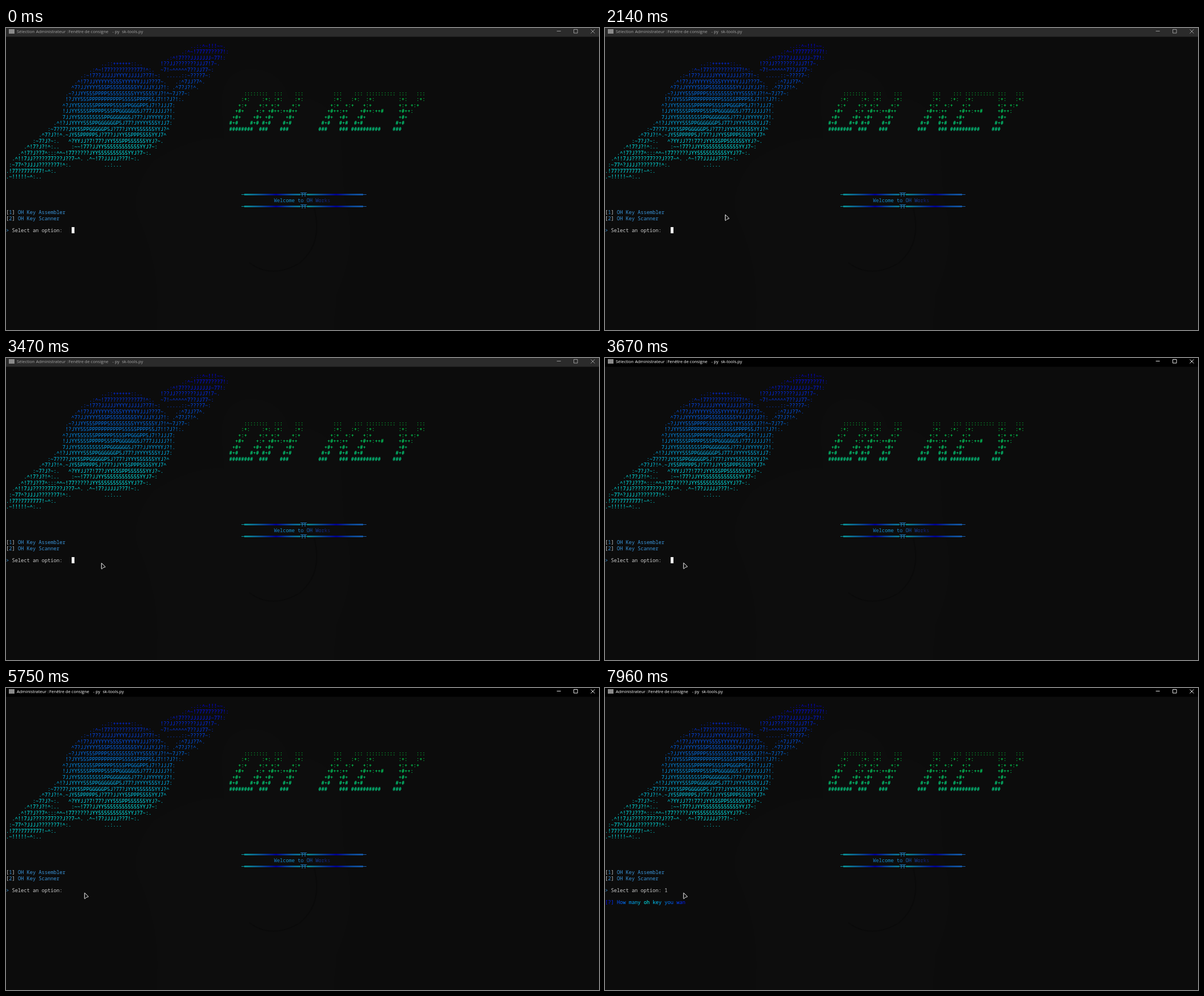
Animation, 1048 px wide and 534 px high, one loop 8 s. Source, as an HTML page with a canvas:

```html
<!DOCTYPE html>
<html lang="fr">
<head>
<meta charset="utf-8">
<title>Terminal</title>
<style>
  html, body { margin: 0; width: 100%; height: 100%; overflow: hidden; background: #0c0c0c; }
  canvas { display: block; }
</style>
</head>
<body>
<canvas id="stage" width="1048" height="534"></canvas>
<script>
const LOOP = 8000, COL = 5.26, ROW = 10.52;
const MONO = '8.767px "Noto Sans Mono", "DejaVu Sans Mono", monospace';
const SANS = '7.5px "Open Sans", "Noto Sans", sans-serif';
const BLUE = '#3a96dd', GREY = '#cccccc';
const ctx = document.getElementById('stage').getContext('2d');

const WING = `
                                                              ..::^~!!!~~.
                                                           .:^~!77777???7!:
                                                      .:^!7???JJJJJJJ~77!:
                                ..::++++++::..      !??JJ???????JJJ7!7~.
                            .:^~!77?????????77!^:.  ~7!~^^^^^7??JJ77~:
                         .:~!7??JJJJJYYYYJJJJJ??7!~:  .....::~????7~:
                       .^!7?JJYYYYY5555YYYYYYJJJ???7~.   .:^7JJ?7^.
                      ^7?JJYYYY555P555555555YYJJJYJJ?!: .^7?J?!^.
                    .~?JJYY555PPPP555555555YYY5555YJ?!^~7J?7~:
                    !?JYY555PPPPPPPPPPP55555PPPP55J7!!?J?!:.
                   ^?JYY555555PPPPPP5555PPGGGPP5J7!?JJJ7:
                   !JJYY5555PPPPP555PPGGGGGG5J?77JJJJJ?!.
                   7JJYY555555555PPGGGGGG5J?7?JJYYYYYJ?!.
                .^!?JJYYYY555PPGGGGGGP5J77?JYYYY555YJJ7:
              :~7??7?JYY55PPGGGGGP5J?77?JYYY555555YYJ?^
           .^7?J?!^.~JY55PPPPP5J?77?JJYY55PPP5555YYJ7^
         :~7?J?~:.   ^?YYJJ?7!77?JYY555PP555555YYJ?~.
      .^!7?J?!^:..    :~~!77?JJYY555555555555YYJ7~:
    .^!7?J??7^:::^^~!77?????JYY5555555555YYJ?7~:.
  .^!!7JJ?????77???J??7~^. .^~!7?JJJJJ??7!~:.
 :~77^?JJJJ??????7!^:.           ..:...
.!77?7777777!~^:.
.~!!!!!~^:..`.split('\n').slice(1);

const BANNER = `
     ::::::::  :::    :::          :::    ::: :::::::::: :::   :::
    :+:    :+: :+:    :+:          :+:   :+:  :+:        :+:   :+:
   +:+    +:+ +:+    +:+          +:+  +:+   +:+         +:+ +:+
  +#+    +:+ +#++:++#++          +#++:++    +#++:++#     +#++:
 +#+    +#+ +#+    +#+          +#+  +#+   +#+           +#+
#+#    #+# #+#    #+#          #+#   #+#  #+#           #+#
########  ###    ###          ###    ### ##########    ###`.split('\n').slice(1);

const PROMPT = '[?] How many oh key you wan';

const clamp = v => Math.min(1, Math.max(0, v));
const mix = (a, b, k) => a + (b - a) * k;
const easeOut = (k, p) => 1 - (1 - k) ** p;

function put(col, row, text, color) {
  ctx.font = MONO;
  ctx.fillStyle = color;
  ctx.fillText(text, col * COL, 34.6 + row * ROW);
}

function rect(x, y, w, h, color) {
  ctx.fillStyle = color;
  ctx.fillRect(x, y, w, h);
}

function stroke(d, color, width = 1) {
  ctx.strokeStyle = color;
  ctx.lineWidth = width;
  ctx.stroke(new Path2D(d));
}

function gradient(x0, x1, colors) {
  const g = ctx.createLinearGradient(x0, 0, x1, 0);
  colors.forEach((c, i) => g.addColorStop(i / (colors.length - 1), c));
  return g;
}

function backdrop() {
  rect(0, 0, 1048, 534, '#0c0c0c');
  ctx.fillStyle = '#0d0d0d';
  ctx.fill(new Path2D('M380 130Q385 72 435 72Q490 76 500 125Q575 115 592 190L598 300Q625 380 585 470L580 534H265Q275 440 240 350Q210 300 260 235Q330 190 385 195Z'));
  stroke('M545 320Q560 380 520 415Q470 445 430 415', '#0a0a0a', 2);
}

function titleBar(t) {
  const active = t >= 3670, selecting = t < 4200;
  const color = active ? '#ffffff' : '#a5a5a5';
  rect(0, 0, 1048, 15.5, active ? '#000000' : '#2b2b2b');
  rect(5, 2, 10, 8, '#8a8a8a');
  ctx.font = SANS;
  ctx.fillStyle = color;
  if (selecting) ctx.fillText('Sélection', 19, 8.8);
  const x = selecting ? 53 : 19;
  ctx.fillText('Administrateur :', x, 8.8);
  ctx.fillText('Fenêtre de consigne', x + 57.5, 8.8);
  ctx.fillText('- py', x + 135, 8.8);
  ctx.fillText('sk-tools.py', x + 152, 8.8);
  stroke('M973.5 5.5h7M1003.5 2.5h6.5v6.5h-6.5zM1033.5 2.5l7 7m0 -7l-7 7', color, 0.9);
}

function rule(row) {
  const y = 31.5 + row * ROW;
  const wave = gradient(424, 637, ['#0a9098', '#0a5090', '#000094', '#0a5a9c', '#0a8c8c', '#0a4890', '#000094', '#0a4898', '#1a60b0']);
  rect(416, y - 0.5, 221, 1, wave);
  rect(421, y - 1.4, 99, 2.8, wave);
  rect(532, y - 1.4, 99, 2.8, wave);
  stroke(`M520.5 ${y - 3}h11M522 ${y - 0.5}h8M523.5 ${y - 3}v6.5M528.5 ${y - 3}v6.5`, '#1c78b8');
}

function screenText() {
  WING.forEach((s, i) => put(0, i, s, `rgb(0,${Math.min(255, 15 * i)},255)`));
  BANNER.forEach((s, i) => put(75, i + 8, s, `rgb(0,255,${70 + 15 * i})`));
  rule(25);
  rule(27);
  put(90, 26, 'Welcome to OH Works', gradient(473, 573, ['#1478c8', '#149cd4', '#1480d0', '#1440a8', '#101468']));
  ['OH Key Assembler', 'OH Key Scanner'].forEach((s, i) => {
    put(0, 28 + i, '[ ]', GREY);
    put(1, 28 + i, i + 1, BLUE);
    put(4, 28 + i, s, BLUE);
  });
  put(0, 31, '>', BLUE);
  put(2, 31, 'Select an option:', GREY);
}

function caret(t) {
  if (t < 4200) rect(116, 352, 5, 11, '#f2f2f2');
  else if (t < 4700 || (t >= 5230 && t < 5750)) rect(105.3, 360.5, 5.2, 2, '#f2f2f2');
  else if (t >= 5770 && t < 6260) rect(110.5, 360.5, 5.2, 2, '#f2f2f2');
  else if (t >= 6710 && t < 6730) rect(0, 371, 5.2, 2, '#f2f2f2');
}

function typing(t) {
  if (t >= 5770) put(20, 31, '1', GREY);
  const shown = Math.floor((t - 7490) / 47 + 17);
  for (let i = 0; i < Math.min(shown, PROMPT.length); i++) {
    const g = 255 * clamp(1 - Math.abs(i - 13.5) / 14);
    put(i, 33, PROMPT[i], `rgb(0,${Math.round(g)},255)`);
  }
}

function pointerAt(t) {
  if (t < 2120) {
    const k = easeOut(clamp((t - 20) / 300), 2);
    return [mix(961, 212.3, k), mix(528, 328.8, k)];
  }
  if (t < 3330) {
    const k = clamp((t - 2120) / 460), s = k * k * (3 - 2 * k);
    return [mix(212.3, 198.5, s), mix(329.6, 367.5, s)];
  }
  const k = clamp((t - 3330) / 340);
  return [mix(198.5, 138.5, easeOut(k, 1.3)), mix(367.5, 362, easeOut(k, 5))];
}

function pointer(t) {
  if (t < 20) return;
  const [x, y] = pointerAt(t);
  ctx.save();
  ctx.translate(x, y);
  ctx.lineJoin = 'round';
  ctx.fillStyle = '#0c0c0c';
  const shape = 'M0.4 0.3L7 6.6Q7.3 7.4 6.2 7.5Q3.6 7.3 2.4 9.3L0.9 10.7Q0.3 10.8 0.3 10Z';
  ctx.fill(new Path2D(shape));
  stroke(shape, '#ffffff');
  ctx.restore();
}

function frame() {
  const t = performance.now() % LOOP;
  backdrop();
  titleBar(t);
  screenText();
  typing(t);
  caret(t);
  pointer(t);
  requestAnimationFrame(frame);
}
frame();
</script>
</body>
</html>
```
